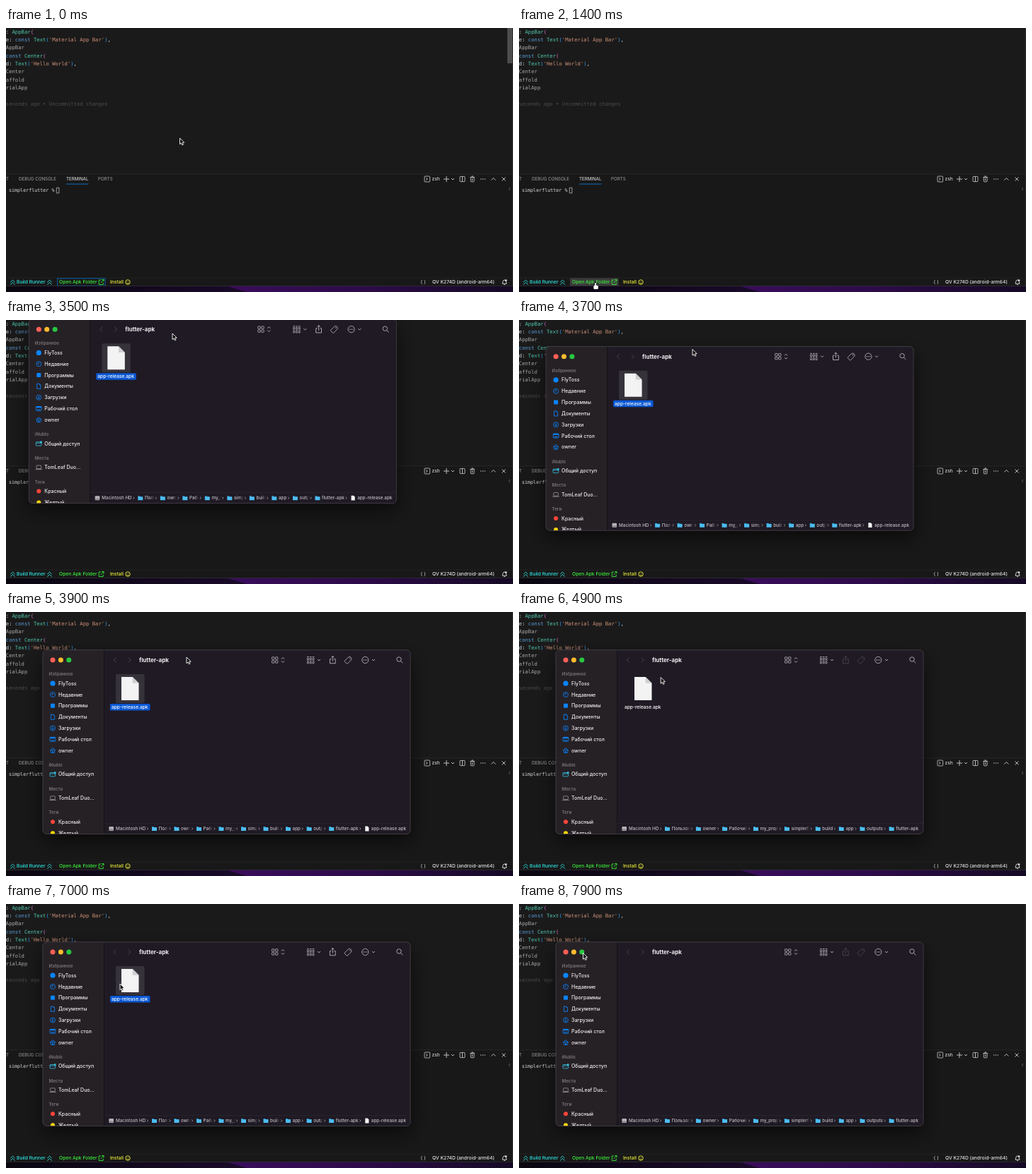
Write an HTML page with a canvas that moves like this. It is 716 px wide and 374 px high and loops after 8000 ms.

```html
<!DOCTYPE html>
<html lang="ru">
<head>
<meta charset="utf-8">
<title>Open Apk Folder</title>
<style>
html, body { margin: 0; width: 100%; height: 100%; overflow: hidden; background: #181818; }
canvas { display: block; width: 716px; height: 374px; }
</style>
</head>
<body>
<canvas id="stage"></canvas>
<script>
const W = 716, H = 374, LOOP = 8000, STEP = 100;
const SANS = 'Inter, "Noto Sans", sans-serif';
const MONO = '"DejaVu Sans Mono", monospace';
const BLUE = '#0a84ff', CYAN = '#2ee6e6', GREEN = '#3df03d', YELLOW = '#f2f23a';
const ACCENT = '#0a78d4';

// Moments of the story, in ms
const HOVER = 800, NOTICE = 1700, OPENED = 1900, NOTICE_END = 2500;
const DRAG = 3400, DROP = 3900, DESELECT = 4800, SELECT = 5200, REMOVED = 7600;

const canvas = document.getElementById('stage');
const ctx = canvas.getContext('2d');
const dpr = window.devicePixelRatio || 1;
canvas.width = W * dpr;
canvas.height = H * dpr;

// Drawing helpers
const clamp = v => Math.max(0, Math.min(1, v));
const smooth = u => u * u * (3 - 2 * u);

function text(s, x, y, size, color, weight = 400, family = SANS) {
  ctx.font = `${weight} ${size}px ${family}`;
  ctx.fillStyle = color;
  ctx.fillText(s, x, y + size * 0.36);
  return ctx.measureText(s).width;
}

function paint(fill, stroke, lw) {
  if (fill) { ctx.fillStyle = fill; ctx.fill(); }
  if (stroke) { ctx.strokeStyle = stroke; ctx.lineWidth = lw; ctx.stroke(); }
}

function rect(x, y, w, h, color) {
  ctx.fillStyle = color;
  ctx.fillRect(x, y, w, h);
}

function round(x, y, w, h, r, fill, stroke, lw = 0.8) {
  ctx.beginPath();
  ctx.roundRect(x, y, w, h, r);
  paint(fill, stroke, lw);
}

function arc(x, y, r, fill, stroke, from = 0, to = Math.PI * 2) {
  ctx.beginPath();
  ctx.arc(x, y, r, from, to);
  paint(fill, stroke, 0.85);
}

function poly(pts, fill, stroke, lw = 0.9) {
  ctx.beginPath();
  for (let i = 0; i < pts.length; i += 2) ctx.lineTo(pts[i], pts[i + 1]);
  if (fill) ctx.closePath();
  paint(fill, stroke, lw);
}

const line = (color, ...pts) => poly(pts, null, color);
const chevron = (x, y, color, w = 2, h = 1) => line(color, x - w, y - h, x, y + h, x + w, y - h);
const angle = (x, y, color, w, h) => line(color, x - w, y - h, x + w, y, x - w, y + h);
const dots = (x, y, gap, r, color) => [-gap, 0, gap].forEach(d => arc(x + d, y, r, color));

function at(x, y, turn, draw) {
  ctx.save();
  ctx.translate(x, y);
  ctx.rotate(turn);
  draw();
  ctx.restore();
}

function shadowed(alpha, blur, drop, draw) {
  ctx.save();
  ctx.shadowColor = `rgba(0,0,0,${alpha})`;
  ctx.shadowBlur = blur * dpr;
  ctx.shadowOffsetY = drop * dpr;
  draw();
  ctx.restore();
}

function page(x, y, w, h, fold, fill, stroke, flap) {
  poly([x, y, x + w - fold, y, x + w, y + fold, x + w, y + h, x, y + h, x, y], fill, stroke);
  if (flap) poly([x + w - fold, y, x + w, y + fold, x + w - fold, y + fold], flap);
}

// Motion
const MOVES = [
  { from: 0, to: 900, x: 108, y: 361 },
  { from: 2400, to: 3200, x: 233, y: 4 },
  { from: DRAG, to: 3500, x: 235, y: 19 },
  { from: 3500, to: DROP, x: 255, y: 64 },
  { from: 4400, to: 5300, x: 161, y: 113 },
  { from: REMOVED, to: 7900, x: 90.5, y: 69.5 }
];

function pointerAt(t) {
  let x = 245.5, y = 156;
  for (const m of MOVES) {
    const e = smooth(clamp((t - m.from) / (m.to - m.from)));
    x += (m.x - x) * e;
    y += (m.y - y) * e;
  }
  return [x, y];
}

function finderAt(t) {
  const left = 1 - clamp((t - DRAG) / (DROP - DRAG));
  return [-22 * left ** 0.5, -81 * left ** 1.75];
}

// Code editor
const INK = {
  p: '#c8dce8', k: '#569cd6', c: '#4ec9b0', s: '#ce9178', o: '#d670c8', b: '#2e9cf0',
  h: '#a8a8a8', g: '#4c4a4a'
};
const CODE = [
  ['p: ', 'cAppBar', 'o('],
  ['pe: ', 'kconst ', 'cText', 'b(', "s'Material App Bar'", 'b)', 'p,'],
  ['hAppBar'],
  ['kconst ', 'cCenter', 'o('],
  ['pd: ', 'cText', 'b(', "s'Hello World'", 'b)', 'p,'],
  ['hCenter'], ['haffold'], ['hrialApp'], [],
  ['gseconds ago • Uncommitted changes']
];

function drawEditor(t) {
  rect(0, 0, W, 207, '#1b1a1a');
  CODE.forEach((parts, row) => {
    let x = -0.2;
    for (const [ink, ...s] of parts)
      x += text(s.join(''), x, 5.2 + row * 11.3, 7.24, INK[ink], 400, MONO);
  });
  rect(708, 0, 7, 50, `rgba(86,86,86,${0.85 * clamp((900 - t) / 500)})`);
}

function drawPanel() {
  const tab = '#a2a2a2', icon = '#cecece', y = 214;
  rect(0, 207, W, 147, '#181818');
  rect(0, 206.5, W, 0.8, '#2a2a2a');
  text('T', 0, y, 6.2, tab);
  text('DEBUG CONSOLE', 18, y, 6.2, tab);
  text('TERMINAL', 85, y, 6.2, '#ececec');
  text('PORTS', 130, y, 6.2, tab);
  rect(85, 220.6, 31.5, 0.9, ACCENT);

  round(591, y - 4, 7.6, 8, 1, null, icon);
  angle(594.2, y, icon, 1, 1.8);
  text('zsh', 601.5, y, 6.6, icon, 500);
  line(icon, 618, y, 626, y);
  line(icon, 622, y - 4, 622, y + 4);
  chevron(631, y, icon);
  round(641, y - 3.6, 7, 7.2, 0.6, null, icon);
  line(icon, 644.5, y - 3.6, 644.5, y + 3.6);
  round(656.3, y - 2.4, 4.8, 6.2, 0.8, null, icon);
  line(icon, 655.4, y - 2.6, 662, y - 2.6);
  line(icon, 657.4, y - 4, 660, y - 4);
  line(icon, 658.7, y - 1, 658.7, y + 2.4);
  dots(673.5, y, 2.7, 0.7, icon);
  chevron(688.3, y, icon, 3, -1.5);
  for (const d of [-2.5, 2.5]) line(icon, 703 - d, y - 2.5, 703 + d, y + 2.5);

  text('simplerflutter %', 4, 230, 6.7, '#dedede', 400, MONO);
  round(71.3, 226.3, 3.6, 7.6, 0, null, '#bdbdbd');
  rect(710.5, 226, 1, 4, '#5a5a5a');
}

function drawStatus(t) {
  const y = 360, pale = '#e2e2e2';
  rect(0, 354, W, 12, '#181818');
  rect(0, 353.6, W, 0.7, '#272727');
  if (t < HOVER) round(72.7, 354.8, 67.4, 10.4, 0, null, ACCENT);
  else if (t < OPENED) rect(72, 354.3, 68.5, 11.2, '#3b3b3b');

  for (const x of [9.5, 61.5])
    for (const d of [-1.4, 2]) chevron(x, y + d, CYAN, 3.2, -1.5);
  text('Build Runner', 15, y, 6.7, CYAN, 500);
  text('Open Apk Folder', 75, y, 6.7, GREEN, 500);
  line(GREEN, 134, 357, 131.2, 357, 131.2, 363.4, 137.2, 363.4, 137.2, 360.6);
  line(GREEN, 133.6, 361, 138, 356.5);
  line(GREEN, 135.2, 356.5, 138, 356.5, 138, 359.2);
  text('Install', 147, y, 6.7, YELLOW, 500);
  arc(172, y, 3.3, null, YELLOW);
  for (const d of [-1.2, 1.2]) arc(172 + d, y - 1, 0.5, YELLOW);
  arc(172, y + 0.3, 1.7, null, YELLOW, 0.3, Math.PI - 0.3);

  text('{ }', 585.5, y, 6.4, pale);
  text('QV K274D (android-arm64)', 602, y, 6.7, pale, 500);
  arc(704, y - 0.8, 2.2, null, pale, Math.PI, 0);
  line(pale, 701.8, y - 0.8, 701, y + 2.2, 707, y + 2.2, 706.2, y - 0.8);
  line(pale, 703.2, y + 3.5, 704.8, y + 3.5);
  arc(706, y - 2.4, 1.4, pale);
}

function drawDesktop() {
  const left = ctx.createLinearGradient(0, 0, 340, 0);
  left.addColorStop(0, '#0a0710');
  left.addColorStop(1, '#1a0a2a');
  const right = ctx.createLinearGradient(310, 0, W, 0);
  right.addColorStop(0, '#3a0c5c');
  right.addColorStop(0.5, '#2c0b48');
  right.addColorStop(1, '#150a24');
  rect(0, 365.6, W, 9, left);
  poly([312, 365.6, W, 365.6, W, H, 340, H], right);
  rect(0, 365.3, W, 0.7, '#343236');
  rect(715, 0, 0.8, 366, '#343434');
}

function drawNotice(t) {
  if (t < NOTICE || t >= NOTICE_END) return;
  shadowed(0.5, 6, 0, () => round(455, 322.5, 254.5, 24.5, 2, '#1b1b1b'));
  round(455, 322.5, 254.5, 24.5, 2, null, '#2c2c2c', 0.7);
  arc(464.7, 335, 3.7, null, '#3794ff');
  rect(464.3, 334.3, 0.8, 2.8, '#3794ff');
  rect(464.3, 332.8, 0.8, 0.8, '#3794ff');
  text('Opening', 472.5, 335, 6.9, '#ececec', 500);
  rect(455.5, 345, 228.5 * clamp((t - 1600) / 600), 1.2, '#2a86dc');
}

// Sidebar icons, drawn around (0, 0)
const ICONS = {
  dot: () => arc(0, 0, 3.6, BLUE),
  clock() {
    arc(0, 0, 3.5, null, BLUE);
    line(BLUE, 0, -2.2, 0, 0, -1.8, 0);
  },
  tile: () => round(-3, -3, 6, 6, 1, BLUE),
  page: () => page(-2.6, -3.6, 5.2, 7.2, 2, null, BLUE, BLUE),
  load() {
    arc(0, 0, 3.5, null, BLUE);
    line(BLUE, 0, -2, 0, 1.8);
    chevron(0, 1, BLUE, 1.6, 0.8);
  },
  desk() {
    round(-3.9, -3, 7.8, 6, 0.8, null, BLUE);
    rect(-3.7, -3, 7.4, 1.8, BLUE);
    rect(-2.6, 1, 5.2, 1, BLUE);
  },
  home() {
    chevron(0, -1.7, BLUE, 4, -1.8);
    round(-2.7, -0.6, 5.4, 3.9, 0.4, null, BLUE);
    rect(-0.8, 0.8, 1.6, 2.4, BLUE);
  },
  shared() {
    round(-4, -2.4, 7.6, 5.4, 0.8, null, '#35c4e6');
    rect(-4, -1.2, 7.6, 0.8, '#35c4e6');
    arc(3.2, -2.2, 1.4, '#35c4e6');
  },
  laptop() {
    round(-3.3, -2.8, 6.6, 4.6, 0.6, null, '#98949a');
    line('#98949a', -4.7, 2.8, 4.7, 2.8);
  },
  red: () => arc(0, 0, 3, '#ff453a'),
  yellow: () => arc(0, 0, 3, '#ffd60a')
};

const GROUPS = {
  'Избранное': {
    'FlyToss': 'dot', 'Недавние': 'clock', 'Программы': 'tile', 'Документы': 'page',
    'Загрузки': 'load', 'Рабочий стол': 'desk', 'owner': 'home'
  },
  'iNublo': { 'Общий доступ': 'shared' },
  'Места': { 'TomLeaf Duo...': 'laptop' },
  'Теги': { 'Красный': 'red', 'Желтый': 'yellow' }
};

function drawSidebar() {
  let y = 88;
  for (const [heading, items] of Object.entries(GROUPS)) {
    text(heading, 60.5, y, 6.2, '#7b757c', 600);
    y += 13.2;
    for (const [label, icon] of Object.entries(items)) {
      at(66, y, 0, ICONS[icon]);
      text(label, 74, y, 7, '#f2eef2', 500);
      y += 15.83;
    }
    y += 4.7;
  }
}

const FOLDERS = ['Macintosh HD', 'Пользователи', 'owner', 'Рабочий стол', 'my_projects',
  'simplerflutter', 'build', 'app', 'outputs', 'flutter-apk'];

function pathIcon(x, y, kind) {
  if (kind === 'disk') {
    round(x, y - 3, 6.6, 6, 1, '#b4b2b6');
    rect(x + 0.6, y + 1, 5.4, 1, '#6f6d72');
  } else if (kind === 'file') {
    page(x + 1, y - 3.4, 5.2, 6.8, 1.8, '#f4f4f4');
  } else {
    rect(x, y - 2.9, 3, 1.5, '#2fa0d8');
    round(x, y - 2, 7, 5, 0.5, '#4cbcf0');
  }
}

// Middle names are cut to a limit and fade out, so the path fills the bar
function drawPath(withFile) {
  const y = 307, size = 6.3;
  const names = withFile ? [...FOLDERS, 'app-release.apk'] : FOLDERS;
  const limit = withFile ? 13.2 : 25.6;
  let x = 155;
  ctx.font = `500 ${size}px ${SANS}`;
  names.forEach((name, i) => {
    const last = i === names.length - 1;
    const full = ctx.measureText(name).width;
    const whole = !i || i >= names.length - 2 || full <= limit;
    const w = whole ? full : limit;
    const ink = ctx.createLinearGradient(x + w - 5, 0, x + w, 0);
    ink.addColorStop(0, '#c2bdc5');
    ink.addColorStop(1, whole ? '#c2bdc5' : '#c2bdc500');
    pathIcon(x - 9.6, y, !i ? 'disk' : last && withFile ? 'file' : 'folder');
    text(name, x, y, size, ink, 500);
    if (!last) angle(x + w + 2.7, y, '#98949c', 0.8, 1.6);
    x += w + 18.3;
  });
}

function drawToolbar(active) {
  const y = 68, ink = '#bbb6be', dim = '#4d4752', act = active ? ink : dim;
  ['#ff5f57', '#febc2e', '#28c840'].forEach((c, i) => arc(66 + i * 11.4, y, 3.5, c));
  angle(154, y, dim, -1.7, 3.4);
  angle(174.5, y, dim, 1.7, 3.4);
  text('flutter-apk', 188, y, 8, '#f0ecf0', 700);

  for (let i = 0; i < 4; i++)
    round(375.5 + i % 2 * 5, 63.8 + (i >> 1) * 5, 3.4, 3.4, 0.5, null, ink);
  for (const d of [-1, 1]) chevron(391, y + d * 2.4, ink, 2, d);
  for (let i = 0; i < 6; i++) {
    const gx = 425 + i % 3 * 3.8, gy = 63.2 + Math.floor(i / 3) * 5.4;
    rect(gx, gy, 2.8, 0.8, ink);
    round(gx + 0.3, gy + 2.1, 2.2, 2.2, 0.4, null, ink);
  }
  chevron(442, y, ink);

  line(act, 459.4, 66.6, 457.4, 66.6, 457.4, 72.8, 465.2, 72.8, 465.2, 66.6, 463.2, 66.6);
  line(act, 461.3, 69.8, 461.3, 62.4);
  chevron(461.3, 63.4, act, 2, -1);
  at(483.4, y, -Math.PI / 4, () => {
    round(-5.2, -2.8, 10.4, 5.6, [1, 2.6, 2.6, 1], null, act);
    arc(3, 0, 0.7, act);
  });

  arc(507.3, y, 4.6, null, ink);
  dots(507.3, y, 2.1, 0.65, ink);
  chevron(519, y, ink);
  arc(555, y - 1, 3.2, null, ink);
  line(ink, 557.3, 69.4, 560.3, 72.3);
}

function drawFile(selected) {
  if (selected) {
    round(155, 88, 40.5, 41, 2, '#36323a');
    round(147, 130, 56.5, 9.5, 1.6, '#0a58d4');
  }
  page(163, 92, 24.5, 33, 8.8, '#f3f3f3', null, '#cfcfd2');
  text('app-release.apk', 149, 134.5, 6.6, '#ffffff', 500);
}

function drawFinder(t) {
  if (t < OPENED) return;
  const frame = [52, 53.8, 519, 260.7, 5.5];
  // Parts of the window react to the selection with a small delay
  const picked = lag => t < DESELECT || (t >= SELECT + lag && t < REMOVED + lag);
  ctx.save();
  ctx.translate(...finderAt(t));
  shadowed(0.6, 28, 10, () => round(...frame, '#1f1a24'));
  ctx.save();
  ctx.beginPath();
  ctx.roundRect(...frame);
  ctx.clip();
  rect(52, 53, 86.5, 262, '#262125');
  rect(138, 53, 0.8, 262, '#121014');
  rect(138.5, 299.2, 433, 0.7, '#2c2731');
  drawSidebar();
  drawToolbar(picked(300));
  if (t < REMOVED) drawFile(picked(0));
  drawPath(picked(100));
  ctx.restore();
  round(...frame, null, '#504b53', 0.7);
  ctx.restore();
}

function drawHand() {
  for (const [fill, edge] of [[null, '#111111'], ['#ffffff', null]]) {
    round(-0.8, 0, 1.7, 6, 0.8, fill, edge, 1.4);
    round(-2.6, 3.6, 6.4, 5.4, 1.6, fill, edge, 1.4);
  }
}

function drawArrow() {
  const tip = [0, 0, 0, 8.7, 2, 6.9, 3.3, 9.9, 4.9, 9.2, 3.6, 6.3, 6.2, 6.2];
  poly(tip, '#0a0a0a', '#ffffff');
}

function render(now) {
  const t = Math.floor((now % LOOP) / STEP) * STEP;
  ctx.setTransform(dpr, 0, 0, dpr, 0, 0);
  drawEditor(t);
  drawPanel();
  drawStatus(t);
  drawDesktop();
  drawNotice(t);
  drawFinder(t);
  at(...pointerAt(t), 0, t >= HOVER && t < OPENED ? drawHand : drawArrow);
}

const start = performance.now();
function tick() {
  render(performance.now() - start);
  requestAnimationFrame(tick);
}
tick();
</script>
</body>
</html>
```
